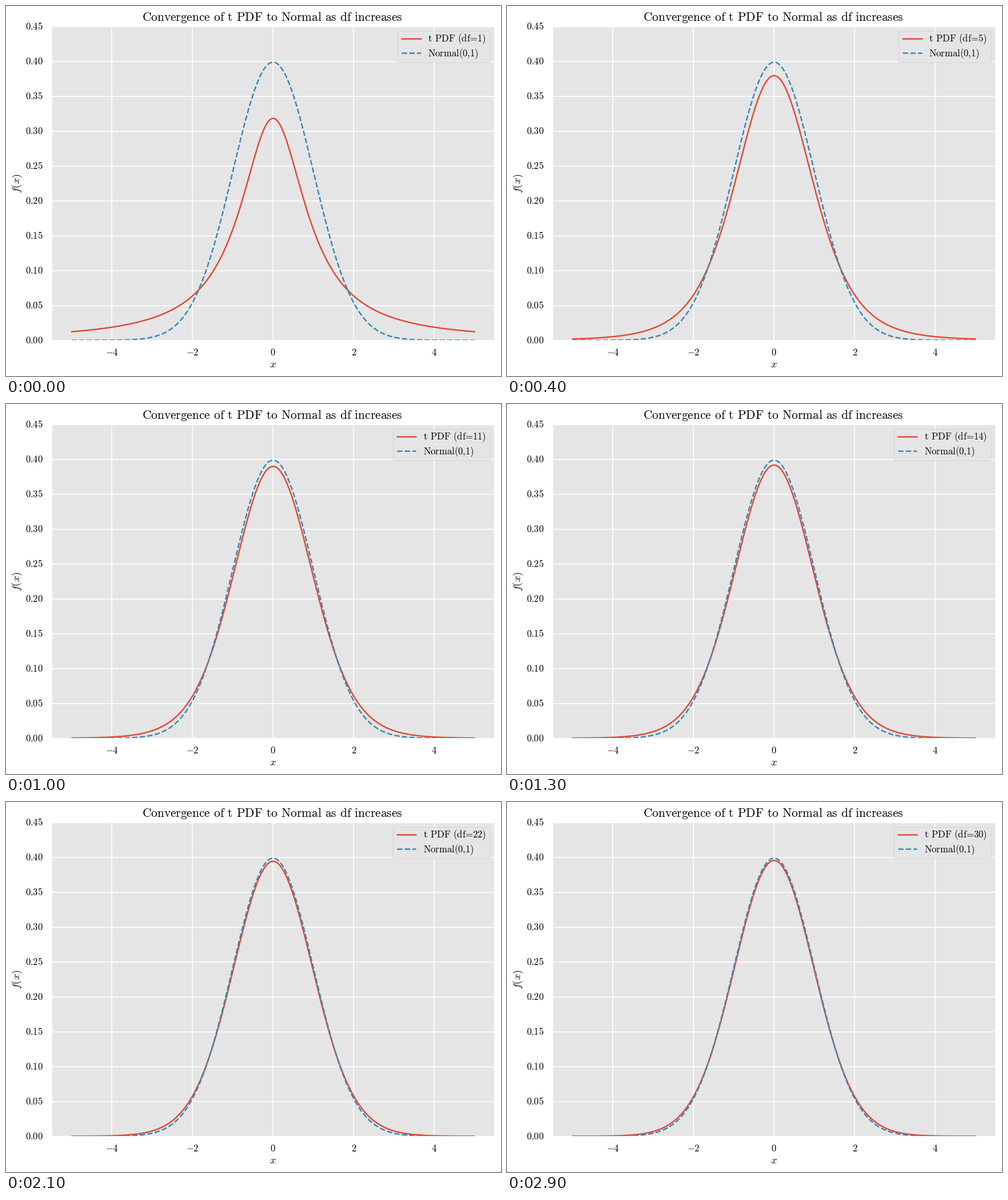
Write a matplotlib script that moves like this. It is 866 px wide and 647 px high and loops after 3 s.

```python
import math

import matplotlib.pyplot as plt
import numpy as np
from matplotlib.animation import FuncAnimation
from matplotlib.patches import FancyBboxPatch

W, H, DPI = 866, 647, 120
LEFT, TOP, WIDTH, HEIGHT = 79.5, 36, 775.5, 548.5
RED, BLUE, GREY = "#E24A33", "#348ABD", "#E5E5E5"
EM = 10 * DPI / 72
MAX_DF = 30

plt.rcParams["mathtext.fontset"] = "cm"


def roman(text):
    """Set running text in upright Computer Modern with text spacing."""
    text = text.replace("=", r"\hspace{-0.2}=\hspace{-0.2}")
    text = text.replace(",", "{,}").replace(" ", r"\hspace{0.38}")
    return rf"$\mathrm{{{text}}}$"


def t_pdf(x, df):
    log_c = math.lgamma((df + 1) / 2) - math.lgamma(df / 2)
    scale = math.exp(log_c) / math.sqrt(df * math.pi)
    return scale * (1 + x**2 / df) ** (-(df + 1) / 2)


fig = plt.figure(figsize=(W / DPI, H / DPI), dpi=DPI, facecolor="white")
ax = fig.add_axes([LEFT / W, 1 - (TOP + HEIGHT) / H, WIDTH / W, HEIGHT / H],
                  facecolor=GREY)
ax.set(xlim=(-5.5, 5.5), ylim=(0, 0.45),
       xticks=range(-4, 5, 2), yticks=np.arange(10) * 0.05)
ax.set_axisbelow(True)
ax.grid(color="white", linewidth=1)
ax.tick_params(length=0, labelbottom=False, labelleft=False)
for spine in ax.spines.values():
    spine.set(color="white", linewidth=1)

# Overlay in pixel units, y pointing down, for text and legend
page = fig.add_axes([0, 0, 1, 1])
page.set(xlim=(0, W), ylim=(H, 0))
page.axis("off")


def put(x, y, text, size=10, ha="center", **kw):
    return page.text(x, y, text, fontsize=size, ha=ha, va="baseline",
                     color="black", **kw)


put(466, 26, roman("Convergence of t PDF to Normal as df increases"), 12.85)
put(467, 632.3, "$x$", 11)
put(24.3, 310, "$f(x)$", 11, rotation=90, rotation_mode="anchor")
for v in range(-4, 5, 2):
    put(LEFT + WIDTH * (v + 5.5) / 11, 610.7, f"${v}$")
for i in range(10):
    put(64.5, TOP + HEIGHT * (1 - i / 9) + 5.3, f"${i * 0.05:.2f}$", ha="right")

x = np.linspace(-5, 5, 500)
solid = dict(color=RED, linewidth=1.5, solid_capstyle="round")
dashed = dict(color=BLUE, linewidth=1.5, linestyle="--")
curve, = ax.plot(x, t_pdf(x, 1), **solid)
ax.plot(x, np.exp(-x**2 / 2) / math.sqrt(2 * math.pi), **dashed)

# Legend: anchored at its right edge, widened by each extra digit
BOX_RIGHT, BOX_TOP, BOX_BOTTOM = 846.9, 44.3, 98.9
ROWS = (62.6, 87.9)
box = FancyBboxPatch((0, BOX_TOP), 1, BOX_BOTTOM - BOX_TOP,
                     boxstyle=f"round,pad=0,rounding_size={0.2 * EM}",
                     facecolor=GREY, edgecolor="#cccccc", linewidth=0.5,
                     alpha=0.8)
page.add_patch(box)
handles = [page.plot([], [], **style)[0] for style in (solid, dashed)]
labels = [put(0, y, roman("Normal(0,1)"), ha="left") for y in ROWS]


def update(frame):
    df = frame + 1
    curve.set_ydata(t_pdf(x, df))
    left = 685.5 - 0.5 * EM * (len(str(df)) - 1)
    box.set_x(left)
    box.set_width(BOX_RIGHT - left)
    start = left + 0.4 * EM
    for handle, label, y in zip(handles, labels, ROWS):
        handle.set_data([start, start + 2 * EM], [y - 0.35 * EM] * 2)
        label.set_x(start + 2.8 * EM - 0.5)
    labels[0].set_text(roman(f"t PDF (df={df})"))
    return [curve, box, *handles, *labels]


anim = FuncAnimation(fig, update, frames=MAX_DF, interval=100, repeat=True,
                     repeat_delay=0, blit=False)
plt.show()
```
